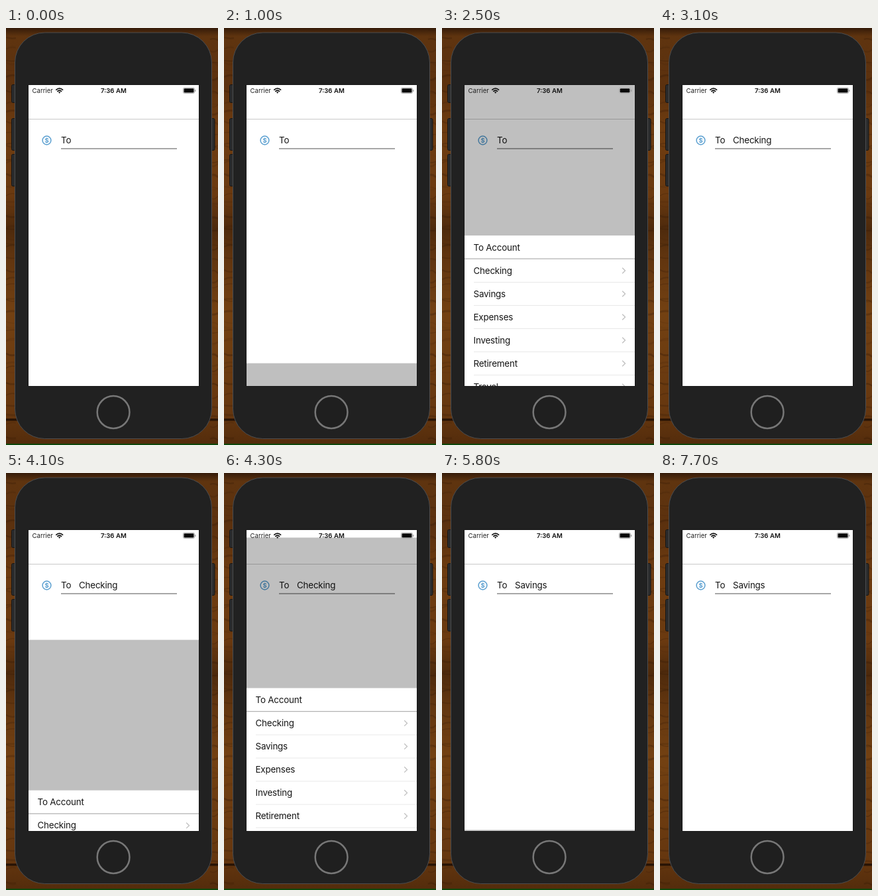
Recreate the animation shown at these times as an HTML page. Size 320 by 629 pixels, loop 8000 ms.

```html
<!DOCTYPE html>
<html lang="en">
<head>
<meta charset="utf-8">
<title>Account picker</title>
<style>
  html, body { margin: 0; width: 100%; height: 100%; overflow: hidden; background: #63380f; }
  svg { display: block; width: 320px; height: 629px; }
  text { font: 13.4px Inter, "Liberation Sans", sans-serif; letter-spacing: -.2px; fill: #151515; }
  .status { font-size: 9.6px; letter-spacing: 0; fill: #222; }
  .clock { font-weight: 600; fill: #111; }
  .coin { font-size: 9.5px; font-weight: 700; letter-spacing: 0; fill: #5a9fd0; text-anchor: middle; }
</style>
</head>
<body>
<svg viewBox="0 0 320 629">
  <defs>
    <linearGradient id="wood" x1="0" y1="0" x2="0" y2="1">
      <stop offset="0" stop-color="#351b09"/>
      <stop offset=".02" stop-color="#5f340f"/>
      <stop offset=".14" stop-color="#5c310e"/>
      <stop offset=".24" stop-color="#6e3c10"/>
      <stop offset=".4" stop-color="#6b3a10"/>
      <stop offset=".48" stop-color="#4e2a0c"/>
      <stop offset=".55" stop-color="#61350f"/>
      <stop offset=".68" stop-color="#734112"/>
      <stop offset=".92" stop-color="#66370f"/>
      <stop offset="1" stop-color="#532c0c"/>
    </linearGradient>
    <clipPath id="screen"><rect x="34" y="86" width="257" height="454"/></clipPath>
  </defs>

  <rect width="320" height="629" fill="url(#wood)"/>
  <g id="grain" fill="none" stroke="#2c1505"></g>
  <path d="M0 591H320" stroke="#3a1e08" stroke-width="4"/>
  <path d="M0 590.5H320" stroke="#241104" stroke-width="2"/>
  <path d="M0 628H320" stroke="#0f470b" stroke-width="2"/>

  <g fill="#2b2c2d" stroke="#161616">
    <rect x="8.5" y="85.5" width="7" height="27" rx="2"/>
    <rect x="8.5" y="136.5" width="7" height="48" rx="2"/>
    <rect x="8.5" y="190.5" width="7" height="48" rx="2"/>
    <rect x="308.5" y="136.5" width="6.5" height="48" rx="2"/>
  </g>
  <rect x="13.5" y="7" width="297" height="612.5" rx="45" fill="#212121" stroke="#4c4d4f"/>
  <circle cx="162.1" cy="579.5" r="24.4" fill="#1f1f1f" stroke="#777" stroke-width="2.5"/>
  <rect x="33.5" y="85.5" width="258" height="455" fill="#111"/>

  <g clip-path="url(#screen)">
    <rect x="34" y="86" width="257" height="454" fill="#fff"/>
    <path d="M34 137.5H291" stroke="#c9c9c9"/>
    <circle cx="61.5" cy="169.5" r="6.4" fill="none" stroke="#5a9fd0" stroke-width="1.5"/>
    <text class="coin" x="61.5" y="173">$</text>
    <text x="83" y="174.3">To</text>
    <text id="value" x="110" y="174.3"></text>
    <path d="M83 182H258" stroke="#505050"/>

    <g id="modal">
      <rect x="34" y="86" width="257" height="454" fill="#000" opacity=".25"/>
      <rect x="34" y="313" width="257" height="227" fill="#fff"/>
      <rect id="mark" x="34" width="257" height="35" fill="#d9d8de"/>
      <text x="47.5" y="335.8">To Account</text>
      <path d="M34 348.2H291" stroke="#b2b2b2" stroke-width="1.2"/>
      <g id="rows" fill="none" stroke="#000"></g>
    </g>

    <text class="status" x="39.5" y="98.3">Carrier</text>
    <g fill="none" stroke="#111" stroke-width="1.7">
      <path d="M75.3 93.6Q80.7 88.6 86.1 93.6M77.3 95.8Q80.7 92.7 84.1 95.8"/>
      <path d="M79 97L80.7 98.8L82.4 97Q80.7 95.7 79 97Z" fill="#111" stroke="none"/>
    </g>
    <text class="status clock" x="143" y="98.3">7:36 AM</text>
    <rect x="267.4" y="90.2" width="17.2" height="8.4" rx="2.2" fill="#fff" stroke="#999" stroke-width=".8"/>
    <rect x="268.5" y="91.3" width="15" height="6.2" rx="1.2" fill="#080808"/>
    <path d="M285.8 93V96" stroke="#999" stroke-width="1.1"/>
  </g>
</svg>
<script>
const $ = id => document.getElementById(id);
const LOOP = 8000, SLIDE = 500, HEIGHT = 454;
const accounts = ['Checking', 'Savings', 'Expenses', 'Investing', 'Retirement', 'Travel'];
const visits = [
  { open: 985, close: 2592, pick: 0 },
  { open: 4004, close: 5392, pick: 1 },
];

$('rows').innerHTML = accounts.map((name, i) => {
  const y = 366 + 35 * i;
  return `<text x="47.5" y="${y + 4.8}" stroke="none">${name}</text>
    <path d="M272.2 ${y - 4.2}l4.3 4.2l-4.3 4.2" stroke-opacity=".25" stroke-width="1.3"/>
    <path d="M48 ${y + 17.5}H291" stroke-opacity=".09"/>`;
}).join('');

// Wavy grain, seeded by index.
$('grain').innerHTML = Array.from({ length: 70 }, (_, i) => {
  const y = i * 9 + 5 * Math.sin(i * 2.7), bend = 5 * Math.sin(i * 1.3);
  return `<path d="M0 ${y}q7 ${bend} 15 ${bend / 2}M308 ${y + 3}q6 ${-bend} 12 ${bend / 2}"
    opacity="${.14 + .12 * Math.sin(i * 4.1)}" stroke-width="${2 + Math.sin(i * 3.3)}"/>`;
}).join('');

// cubic-bezier(.32, .72, 0, 1), solved by bisection.
function ease(x) {
  if (x <= 0) return 0;
  if (x >= 1) return 1;
  let lo = 0, hi = 1;
  for (let i = 0; i < 24; i++) {
    const s = (lo + hi) / 2;
    if (.96 * s * (1 - s) ** 2 + s ** 3 < x) lo = s; else hi = s;
  }
  const r = 1 - lo;
  return 2.16 * r * r * lo + 3 * r * lo * lo + lo ** 3;
}

function draw(t) {
  let shift = HEIGHT, value = '', picked = -1;
  for (const { open, close, pick } of visits) {
    if (t < open) break;
    shift = HEIGHT * (1 - ease((t - open) / SLIDE) + ease((t - close) / SLIDE));
    picked = t >= close ? pick : -1;
    if (picked >= 0) value = accounts[picked];
  }
  $('modal').setAttribute('transform', `translate(0 ${shift.toFixed(2)})`);
  $('value').textContent = value;
  $('mark').setAttribute('y', 348.5 + 35 * Math.max(picked, 0));
  $('mark').setAttribute('visibility', picked < 0 ? 'hidden' : 'visible');
}

const start = performance.now();
function tick() {
  draw((performance.now() - start) % LOOP);
  requestAnimationFrame(tick);
}
tick();
</script>
</body>
</html>
```
